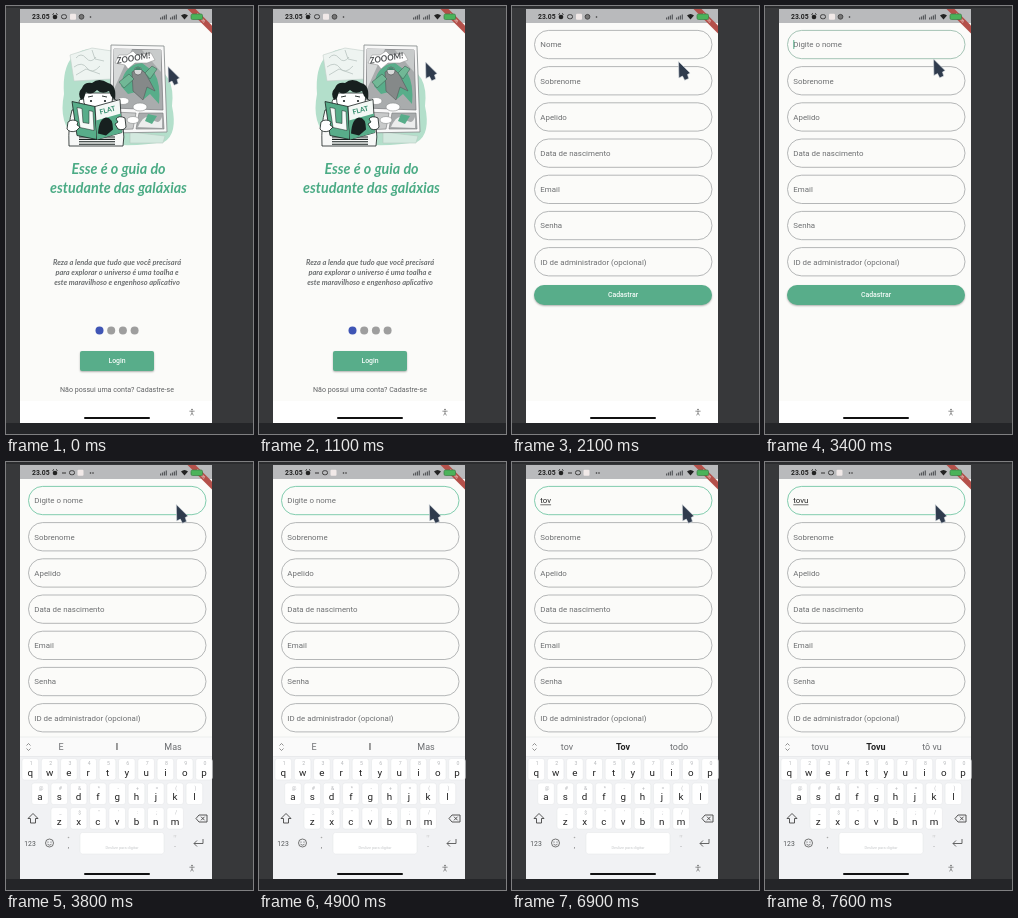
An HTML page with a canvas that plays this animation: 247 by 428 pixels, repeating every 8000 ms.

```html
<!DOCTYPE html>
<html lang="pt">
<head>
<meta charset="utf-8">
<style>
html, body { margin: 0; width: 100%; height: 100%; overflow: hidden; background: #37383a; }
canvas { display: block; width: 247px; height: 428px; }
</style>
</head>
<body>
<canvas id="stage"></canvas>
<script>
const W = 247, H = 428, LOOP = 8000;
const GREEN = '#58ad8a', MINT = '#b3dfcb', INK = '#17201f', PAGE = '#fbfbf9';
const LEFT = 14, WIDE = 192;
const canvas = document.getElementById('stage');
const ctx = canvas.getContext('2d');
const scale = window.devicePixelRatio || 1;
canvas.width = W * scale;
canvas.height = H * scale;

function rect(x, y, w, h, fill) {
  ctx.fillStyle = fill;
  ctx.fillRect(x, y, w, h);
}

function paint(fill, stroke, line = 0.7) {
  if (fill) { ctx.fillStyle = fill; ctx.fill(); }
  if (stroke) { ctx.strokeStyle = stroke; ctx.lineWidth = line; ctx.stroke(); }
}

function round(x, y, w, h, r, fill, stroke, line) {
  ctx.beginPath();
  ctx.roundRect(x, y, w, h, r);
  paint(fill, stroke, line);
}

function shape(d, fill, stroke, line = 0.7) {
  const p = new Path2D(d);
  if (fill) { ctx.fillStyle = fill; ctx.fill(p); }
  if (stroke) { ctx.strokeStyle = stroke; ctx.lineWidth = line; ctx.stroke(p); }
}

function disc(x, y, r, fill, stroke, line) {
  ctx.beginPath();
  ctx.arc(x, y, r, 0, 7);
  paint(fill, stroke, line);
}

function oval(x, y, rx, ry, fill, stroke, line) {
  ctx.beginPath();
  ctx.ellipse(x, y, rx, ry, 0, 0, 7);
  paint(fill, stroke, line);
}

function text(s, x, y, size, fill, align = 'left', style = '', family = 'Roboto') {
  ctx.font = `${style} ${size}px ${family}, sans-serif`;
  ctx.textAlign = align;
  ctx.fillStyle = fill;
  ctx.fillText(s, x, y);
}

function placed(x, y, angle, draw) {
  ctx.save();
  ctx.translate(x, y);
  ctx.rotate(angle);
  draw();
  ctx.restore();
}

function frame() {
  rect(0, 0, W, H, '#37383a');
  rect(0, 0, W, 2, '#2b2c2e');
  rect(0, 417, W, 11, '#242528');
  rect(LEFT, 3, WIDE, 414, PAGE);
}

function statusBar(typing) {
  rect(LEFT, 3, WIDE, 14, '#b9babc');
  text('23.05', 26, 13.2, 6.8, '#222', 'left', 'bold');
  disc(49, 11, 2.3, '#222');
  shape('M46.5 8.5l1.5-1M51.5 8.5l-1.5-1', null, '#222', 1);
  if (typing) rect(56, 10.5, 4, 1, '#333');
  const x = typing ? 66 : 58;
  round(x - 2.5, 8.7, 5, 4, 1.8, null, '#333', 0.9);
  const m = typing ? 74.5 : 67;
  round(m - 3, 7.8, 6, 6, 1, '#f1e9e8');
  if (!typing) disc(75.5, 10.8, 2.4, '#777', '#333', 0.8);
  disc(84.5, 11, 0.8, '#333');
  if (typing) disc(87, 11, 0.8, '#333');
  for (const sx of [154, 164]) {
    for (let i = 0; i < 4; i++) rect(sx + i * 1.9, 11.5 - i, 1.2, 2 + i, '#55575a');
  }
  shape('M175 9.5Q178.5 6.5 182 9.5L178.5 13.5Z', '#222');
  shape('M181.5 3H189.5L206 19.5V27.5Z', '#b4504a');
  placed(194.5, 12.2, Math.PI / 4, () => text('DEBUG', 0, 1, 3.6, '#eecfcb', 'center', 'bold'));
  round(185, 8, 11.5, 5.5, 1.5, '#4bb35a', '#3a7d45');
}

function bottomBar(fill) {
  rect(LEFT, 395, WIDE, 22, fill);
  round(78, 411, 66, 2, 1, '#111');
  disc(186, 403.6, 0.8, '#666');
  shape('M183.4 405.2h5.2M186 405v2M186 407l-1.4 2.4M186 407l1.4 2.4', null, '#666', 0.7);
}

function backdrop() {
  shape('M67 50Q82 38 100 46Q120 54 144 60Q170 66 166 100Q172 128 158 136Q130 141 98 138L70 132Q52 118 58 88Q56 62 67 50Z', MINT);
  shape('M64 49l22-7 20 3v28l-38 2Z', '#eef4f1', '#c3cfca', 0.6);
  shape('M70 52q5-6 10 0t10-1M68 61q8-6 13 1t13-2M86 44l3 9 9 2M70 69l10-6 14 5', null, '#b9c5c0', 0.8);
  shape('M124 126l35 4-2 7-33 0Z', '#d3e9df', '#b7cbc2', 0.6);
}

function comic() {
  shape('M105 39L158 40 161 126 104 127Z', '#f8f8f8', '#8d9292', 0.9);
  shape('M108 43L155 44 157 104 107 102Z', '#a9acad', '#77797b', 0.7);
  shape('M108 43L126 43 108 83Z', '#d7d9d9');
  shape('M136 44L155 44 155 66Z', '#c8cbcb');
  // flying figure
  shape('M117 71Q122 58 136 57L148 66Q155 78 153 98L144 88 138 93 130 86 122 88 115 80Z', GREEN);
  shape('M126 66Q134 60 140 68L149 85 141 81 137 94 127 85Z', '#858989', '#55595a', 0.6);
  shape('M113 76l10-8 5 5-10 9ZM139 67l7-7 5 3-7 10Z', '#71b896', '#436558', 0.6);
  disc(132, 65, 4, '#d8dada', '#55585a', 0.7);
  shape('M128 64q4-6 8 0Z', '#47896f');
  oval(117, 95, 6, 3.5, '#fff', '#8a8d8d', 0.6);
  oval(134, 101, 7, 4, '#fff', '#8a8d8d', 0.6);
  shape('M109 57l4-8 8 0 6-4 4 4 14-2 4 7-8 3-12 0-7 6-3-4Z', '#fff', '#888', 0.5);
  placed(128, 55, -0.17, () => text('ZOOOM!', 0, 0, 8.6, '#4d5052', 'center', 'bold italic', 'Lato'));
  // lower strips
  shape('M107 106L130 107 127 123 107 124Z', '#c8caca', '#77797b', 0.6);
  shape('M133 107L157 107 158 123 130 123Z', '#a9acad', '#77797b', 0.6);
  shape('M132 121q7-15 14-8t10-2v11Z', '#eceded');
  oval(127, 114, 6, 3.5, '#fff', '#8a8d8d', 0.6);
  shape('M142 108l9 2-5 8-7-3Z', GREEN);
}

function head() {
  disc(79, 93, 3, '#fff', INK, 0.7);
  disc(111, 93, 3, '#fff', INK, 0.7);
  shape('M80 84Q80 106 95 106Q110 106 110 84Z', '#fff', INK, 0.8);
  shape('M78 91Q74 84 79 79Q81 73 89 74Q96 68 105 74Q114 76 112 91L108 87 106 82Q99 86 94 81Q88 87 83 83L81 89Z', INK);
  shape('M85 88l5-1M99 87l5 1', null, INK, 0.9);
  disc(88, 92, 1.1, INK);
  disc(102, 92, 1.1, INK);
}

function book() {
  shape('M66 101L89 106 91 139 71 135Z', GREEN, INK, 0.8);
  shape('M89 106L114 99 116 132 91 139Z', '#f3f8f5', INK, 0.8);
  shape('M90 120L115 113 116 132 91 139Z', GREEN);
  shape('M71 107l5 1 1 14 6 1 0-13 4 1 1 19-14-3Z', '#f4faf7', INK, 0.5);
  placed(102, 112, -0.25, () => text('FLAT', 0, 0, 7, '#2f8a69', 'center', 'bold', 'Lato'));
  shape('M92 133q1-15 8-16q7 0 7 12l-7 6Z', INK);
}

function reader() {
  shape('M66 104Q62 118 63 140L117 140Q120 121 112 109L101 103 80 103Z', '#f7f8f7', INK, 0.8);
  for (let i = 0; i < 4; i++) shape(`M73 ${131 + i * 2.4}H109`, null, INK, 1.1);
  placed(-3, 3, 0, head);
  placed(0, -5.5, 0, book);
  shape('M62 116q5-4 10 0l-1 3 3 2-4 4q-6 2-9-2Z', '#fff', INK, 0.8);
  shape('M119 112q-6-3-9 1l2 3-3 2 3 5q6 2 8-2Z', '#fff', INK, 0.8);
}

function welcome() {
  backdrop();
  comic();
  reader();
  const title = (s, y) => text(s, 112.5, y, 14.3, '#4bab85', 'center', 'italic bold', 'Lato');
  title('Esse é o guia do', 168);
  title('estudante das galáxias', 187);
  ['Reza a lenda que tudo que você precisará',
   'para explorar o universo é uma toalha e',
   'este maravilhoso e engenhoso aplicativo'].forEach((s, i) =>
    text(s, 111, 259 + i * 9.8, 7.45, '#6b6e70', 'center', 'italic bold', 'Lato'));
  for (let i = 0; i < 4; i++) disc(93.5 + i * 11.7, 324.4, 4, i ? '#9e9e9e' : '#3f55b5');
  button(74, 345, 74, 20, 2, 'Login');
  text('Não possui uma conta? Cadastre-se', 111, 385.5, 7.1, '#606264', 'center');
}

function button(x, y, w, h, r, label) {
  ctx.save();
  ctx.shadowColor = 'rgba(0,0,0,.3)';
  ctx.shadowBlur = 2 * scale;
  ctx.shadowOffsetY = scale;
  round(x, y, w, h, r, GREEN);
  ctx.restore();
  text(label, x + w / 2, y + h / 2 + 2.4, 6.9, '#f4fbf8', 'center', '500');
}

const LABELS = ['Nome', 'Sobrenome', 'Apelido', 'Data de nascimento', 'Email', 'Senha',
  'ID de administrador (opcional)'];

function typedAt(t) {
  if (t < 5800) return '';
  return 'tovu'.slice(0, t < 6400 ? 1 : t < 6900 ? 2 : t < 7200 ? 3 : 4);
}

function caretAt(t) {
  const on = [[3400, 3800], [4500, 4900], [5600, 6400], [7200, 7600]];
  return on.some(([a, b]) => t >= a && t < b);
}

function form(t) {
  const focus = t >= 3400;
  LABELS.forEach((label, i) => {
    const y = 24.4 + i * 36.2;
    const edge = i || !focus ? '#a3a5a6' : t < 3500 ? '#8eb5a4' : '#62c19b';
    round(22.5, y, 177.5, 28.3, 14.1, null, edge, 0.8);
    if (i) text(label, 28.3, y + 17, 7.9, '#6d6f71');
  });
  const typed = typedAt(t), x = 28.3, base = 41.4;
  if (t < 6000) {
    ctx.globalAlpha = t < 5800 ? 1 : 0.25;
    text(focus ? 'Digite o nome' : 'Nome', x, base, 7.9, '#6d6f71');
    ctx.globalAlpha = 1;
  }
  text(typed, x, base, 7.9, '#222');
  const end = x + ctx.measureText(typed).width;
  if (typed) rect(x, base + 1.1, end - x, 0.7, '#333');
  if (caretAt(t)) rect(end, 34, 1, 9, typed ? '#222' : GREEN);
  if (t < 3600) button(22, 279, 178, 20, 10, 'Cadastrar');
}

function suggestions(typed) {
  if (!typed) return ['E', 'I', 'Mas'];
  if (typed.length === 1) return ['the', 't', 'this'];
  const cap = typed[0].toUpperCase() + typed.slice(1);
  return [typed, cap, typed.length < 4 ? 'todo' : 'tô vu'];
}

function keyRow(letters, hints, x, y) {
  [...letters].forEach((c, i) => {
    const cx = x + i * 19.3;
    round(cx - 8.3, y, 16.6, 21.5, 2.5, '#fff', '#e3e4e7', 0.5);
    text(hints[i], cx + 1, y + 6.7, 5.2, '#b5b7ba', 'center');
    text(c, cx, y + 17, 9.8, '#222', 'center');
  });
}

function keyboard(typed) {
  rect(LEFT, 275, WIDE, 142, '#f1f2f4');
  rect(LEFT, 275, WIDE, 20, '#fafafa');
  rect(LEFT, 274.7, WIDE, 0.6, '#e2e3e5');
  rect(LEFT, 294.3, WIDE, 0.6, '#dedfe2');
  shape('M20.5 283.5l2-2 2 2M20.5 286.5l2 2 2-2', null, '#777', 0.8);
  suggestions(typed).forEach((s, i) => {
    const main = i === 1;
    text(s, 55 + i * 56, 288, 9, main ? '#222' : '#6c6e71', 'center', main && typed ? 'bold' : '');
  });
  keyRow('qwertyuiop', '1234567890', 24.3, 296.5);
  keyRow('asdfghjkl', '@#&*-+=()', 34, 321);
  keyRow('zxcvbnm', '_$"\':;/', 53.3, 345.6);

  shape('M27 351.5l-5 5h2.5v4.5h5v-4.5h2.5Z', null, '#444', 0.9);
  shape('M190 356.5l3-3.5h8v7h-8ZM195 354.7l3.6 3.6M198.6 354.7l-3.6 3.6', null, '#444', 0.9);
  text('123', 24, 383.6, 6.8, '#55585a', 'center');
  disc(43.5, 381, 4, null, '#555', 0.8);
  disc(42, 380, 0.6, '#555');
  disc(45, 380, 0.6, '#555');
  shape('M41.5 382.2q2 2 4 0', null, '#555', 0.7);
  text(',', 62.5, 386, 8, '#777', 'center');
  disc(62.5, 375.5, 0.8, '#aaa');
  round(74, 370.5, 84, 21.5, 2.5, '#fff', '#e3e4e7', 0.5);
  text('Deslize para digitar', 116, 387, 3.9, '#c6c8ca', 'center');
  text('.', 169, 385, 8, '#777', 'center');
  text('!?', 169, 376, 4, '#bbb', 'center');
  shape('M197 377v4.5h-9M191 378.5l-3 3 3 3', null, '#555', 0.9);
}

// time, x, y of the arrow tip
const PATH = [[0, 162, 60.5], [100, 162, 60.5], [200, 163, 59.5], [400, 163, 59.5], [800, 166.5, 56],
  [1800, 166.5, 56], [1900, 166.5, 55.5], [3300, 166.5, 55.5], [3400, 168.5, 53], [3600, 170.3, 42.5],
  [LOOP, 170.3, 42.5]];

function pointer(t) {
  const i = PATH.findIndex(p => p[0] > t);
  const [t0, x0, y0] = PATH[i - 1], [t1, x1, y1] = PATH[i];
  const k = (t - t0) / (t1 - t0);
  ctx.lineJoin = 'round';
  placed(x0 + (x1 - x0) * k, y0 + (y1 - y0) * k, 0, () =>
    shape('M0 0L.4 16.5 4 14.6 6.2 18.8 10.2 17 9 13 11.6 11.6Z', '#2f3b4d', '#d9dde2', 0.6));
  ctx.lineJoin = 'miter';
}

function draw(now) {
  const t = Math.floor((now % LOOP) / 100) * 100;
  const typing = t >= 3800;
  ctx.setTransform(scale, 0, 0, scale, 0, 0);
  frame();
  if (t < 2100) welcome(); else form(t);
  if (typing) keyboard(typedAt(t));
  bottomBar(typing ? '#f1f2f4' : '#fff');
  statusBar(typing);
  pointer(t);
}

const start = performance.now();
function tick() {
  draw(performance.now() - start);
  requestAnimationFrame(tick);
}
tick();
</script>
</body>
</html>
```
